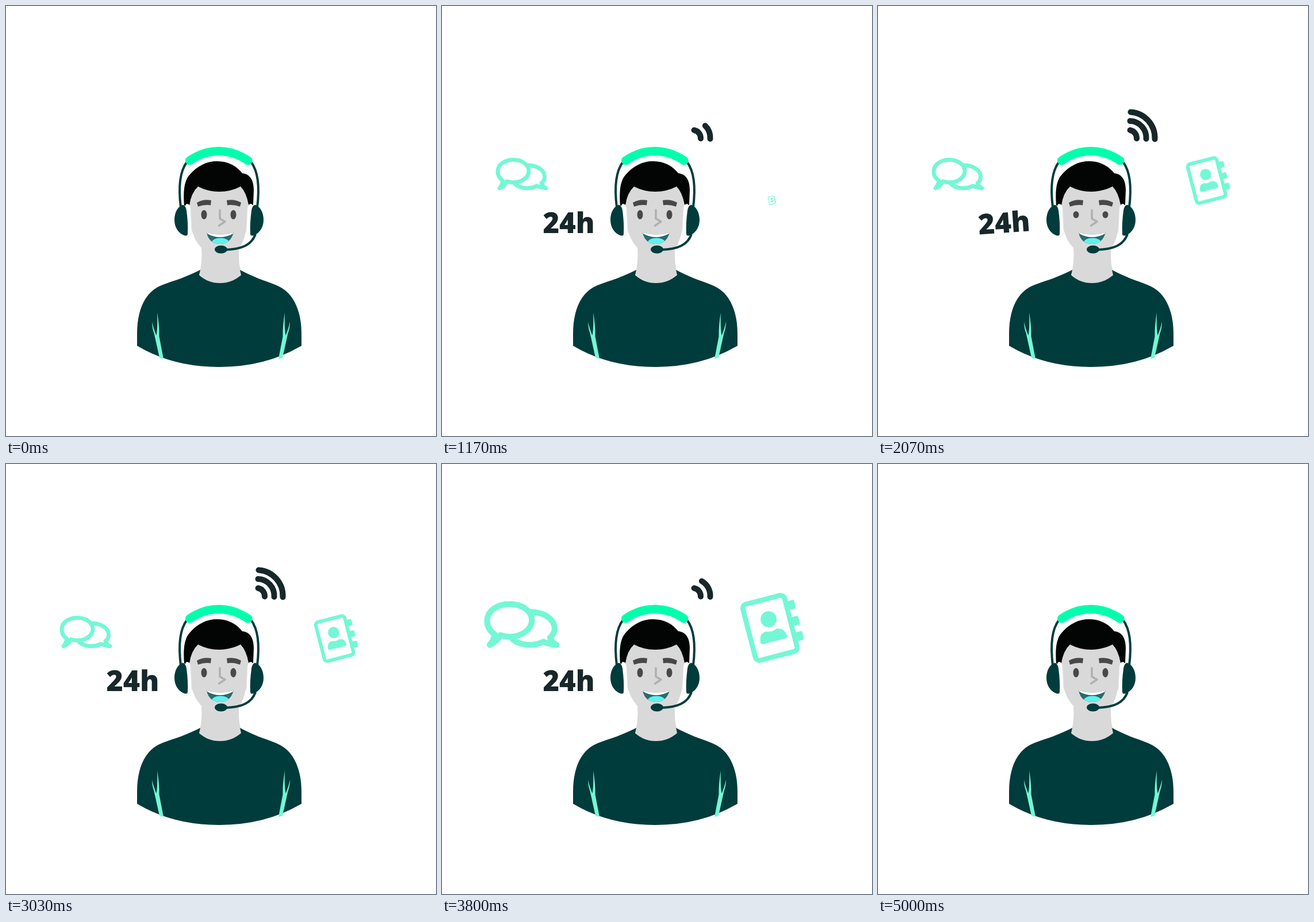
Write an HTML page that moves like this. It is 748 px wide and 748 px high and loops after 5030 ms.

```html
<!DOCTYPE html>
<html lang="en">
<head>
<meta charset="utf-8">
<title>24h support</title>
<style>
  html, body { margin: 0; width: 100%; height: 100%; overflow: hidden; background: #fff; }
  svg { display: block; width: 100vw; height: 100vh; }
  .dark { fill: #003c3b; }
  .wire { fill: none; stroke: #003c3b; stroke-width: 4; }
  .mint { fill: #74f7d5; }
  .line { fill: none; stroke: #74f7d5; stroke-width: 7; stroke-linejoin: round; stroke-linecap: round; }
  .arc { fill: none; stroke: #17272a; stroke-width: 10; stroke-linecap: round; }
  .gray { fill: #484848; }
  text { font: 800 49px "Open Sans", sans-serif; fill: #17272a; text-anchor: middle; }
</style>
</head>
<body>
<svg viewBox="0 0 748 748">
  <defs>
    <path id="fold" class="mint" d="M254 549 Q257 563 261.500 573 Q264 560 263 533 Q267 556 266.500 575 L274 614 L267 612 L257.500 569 Q254 560 254 549Z"/>
    <path id="brow" class="gray" d="M332 342 Q343 335.500 357 338 L356 346.500 Q345 345 334 349Z"/>
    <g id="cup">
      <path d="M313 345 Q320 343 321 352 L323 391 Q323 401 316 400Z" fill="#fff" stroke="#e6e6e6" stroke-width=".8"/>
      <path class="dark" d="M307 346 Q312 345 314 356 Q317 378 316 396 Q316 401 310 399 C299 395 293 384 293 372 C293 359 299 349 307 346Z"/>
      <path class="wire" d="M315 271 C301 289 300 318 304 350"/>
    </g>
    <clipPath id="lips"><path d="M349 394 Q372 401 396 394 Q390 414 373 414 Q353 414 349 394Z"/></clipPath>
  </defs>

  <path fill="#d9d9d9" d="M316 335 L321 380 Q325 405 340 421 Q342 446 336 466 Q350 485 373 485 Q396 485 410 466 Q404 450 405 424 Q417 405 420 375 L425 335 Q415 306 371 306 Q325 306 316 335Z"/>
  <path class="dark" d="M338 459 C302 477 286 479 268 487 C240 499 228 532 228 570 L228 591 Q290 628 371 628 Q452 628 514 591 L514 570 C514 532 501 499 473 487 C456 479 441 477 407 459 L409 468 Q393 482 372 482 Q351 482 336 468Z"/>
  <use href="#fold"/>
  <use href="#fold" transform="translate(748) scale(-1 1)"/>

  <path fill="#030505" d="M310 347 C308 322 310 303 320 293 C333 278 349 270 367 270 C387 270 402 279 411 291 C425 292 431 304 431 320 L430 346 L422 346 Q418 324 408 314 Q391 323 371 323 Q351 323 334 314 Q322 325 319 347Z"/>
  <use href="#cup"/>
  <use href="#cup" transform="translate(741) scale(-1 1)"/>
  <path d="M319.500 269 Q343 252.500 370 252.500 Q397 252.500 421 269" fill="none" stroke="#00ffac" stroke-width="15" stroke-linecap="round"/>
  <path class="wire" d="M434 397 C427 416 410 423 382 424"/>
  <ellipse class="dark" cx="374" cy="423.500" rx="11" ry="7"/>

  <use href="#brow"/>
  <use href="#brow" transform="translate(741) scale(-1 1)"/>
  <g id="eyes" class="gray">
    <ellipse cx="344.500" cy="363" rx="5" ry="8"/>
    <ellipse cx="395.500" cy="363" rx="5" ry="8"/>
  </g>
  <path d="M372 355 V370 L381 375 L370.500 382" fill="none" stroke="#b0b0b0" stroke-width="3.500" stroke-linecap="round" stroke-linejoin="round"/>
  <g id="mouth"><g clip-path="url(#lips)">
    <rect x="345" y="390" width="55" height="28" fill="#2a6b6c"/>
    <ellipse cx="373" cy="411" rx="15" ry="7.500" fill="#62f0ee"/>
    <path d="M348 392 L397 392 L395 396 Q372 408 350 396Z" fill="#fff"/>
  </g></g>

  <g id="label"><text x="220.500" y="394.500">24h</text></g>

  <g id="chat" class="line">
    <path d="M106 304 Q96 297 97 286 C98 275 110 267.500 124 267.500 C139 267.500 151 276 151 287 C151 298 139 307 124 307 Q119 307 113 305 Q108 314 100 317 Q105 311 106 304Z"/>
    <path d="M151 277 C168 278 179 287 178.500 298 Q178 304 173 308 Q175 314 181 317 Q172 316 165 313 C151 320 133 317 126 308"/>
  </g>

  <g id="book">
    <g transform="translate(574 303) rotate(-14.500)">
      <rect class="line" x="-28.500" y="-35" width="52" height="70" rx="5" style="stroke-width:6"/>
      <path class="mint" d="M25 -26h7q2 0 2 2v7q0 2 -2 2h-7Z M25 -6h7q2 0 2 2v7q0 2 -2 2h-7Z M25 13h7q2 0 2 2v7q0 2 -2 2h-7Z"/>
      <circle class="mint" cx="-1.500" cy="-10.500" r="9.700"/>
      <path class="mint" d="M-18 14 Q-17 3 -8 3 Q-2 6 4 3 Q14 3 15 14 Q15 17 12 17 L-15 17 Q-18 17 -18 14Z"/>
    </g>
  </g>

  <path class="arc" pathLength="1" d="M438.500 216 A14 14 0 0 1 450 230.500"/>
  <path class="arc" pathLength="1" d="M438.500 200 A29 29 0 0 1 466.500 231"/>
  <path class="arc" pathLength="1" d="M439.500 184.500 A45 45 0 0 1 481.500 231.500"/>
</svg>
<script>
const LOOP = 5030;
const $ = id => document.getElementById(id);
const arcs = [...document.querySelectorAll('.arc')];

const ramp = (t, from, to) => Math.min(1, Math.max(0, (t - from) / (to - from)));
const smooth = u => u * u * (3 - 2 * u);
const ease = (t, from, to) => smooth(ramp(t, from, to));
const bump = (t, from, to) => Math.sin(Math.PI * ramp(t, from, to)) ** 2;

// Grow in, pulse once and shrink away, always from the bottom centre.
const items = [
  { id: 'label', x: 220, y: 394, enter: [420, 880], pulse: [3000, 3490], leave: [4690, 4990], tall: true },
  { id: 'chat', x: 139, y: 322, enter: [540, 1000], pulse: [3500, 3990], leave: [4610, 4930] },
  { id: 'book', x: 574, y: 346, enter: [1050, 1480], pulse: [3500, 3990], leave: [4530, 4850] }
];
const waves = [
  { enter: [840, 1070], leave: [3970, 4220] },
  { enter: [1050, 1280], leave: [3710, 3960] },
  { enter: [1260, 1480], leave: [3450, 3700] }
];

function pose(el, x, y, sx, sy, angle = 0) {
  el.setAttribute('transform',
    `translate(${x} ${y}) rotate(${angle}) scale(${sx} ${sy}) translate(${-x} ${-y})`);
}

function draw(t) {
  for (const { id, x, y, enter, pulse, leave, tall } of items) {
    const size = ease(t, ...enter) * (1 - ease(t, ...leave));
    const zoom = 1 + 0.5 * bump(t, ...pulse);
    const angle = tall ? 4 * Math.sin(3 * Math.PI * ramp(t, 1640, 2470)) : 0;
    const el = $(id);
    el.style.display = size > 0.002 ? '' : 'none';
    pose(el, x, y, zoom * (tall ? 1 : size), zoom * size, angle);
  }

  waves.forEach(({ enter, leave }, i) => {
    const shown = ease(t, ...enter) * (1 - ease(t, ...leave));
    const style = arcs[i].style;
    style.display = shown > 0.01 ? '' : 'none';
    style.strokeDasharray = shown < 1 ? `${shown} 3` : 'none';
    style.strokeDashoffset = shown < 1 ? shown - 1 : 0;
  });

  const blink = [720, 2020, 3320, 4620].reduce((sum, c) => sum + bump(t, c - 80, c + 80), 0);
  pose($('eyes'), 370, 363, 1, 1 - 0.9 * blink);
  const mouth = 1 - 0.3 * bump(t, 1250, 1650);
  pose($('mouth'), 372.5, 394, mouth, mouth);
}

const start = performance.now();
function tick() {
  draw((performance.now() - start) % LOOP);
  requestAnimationFrame(tick);
}
tick();
</script>
</body>
</html>
```
